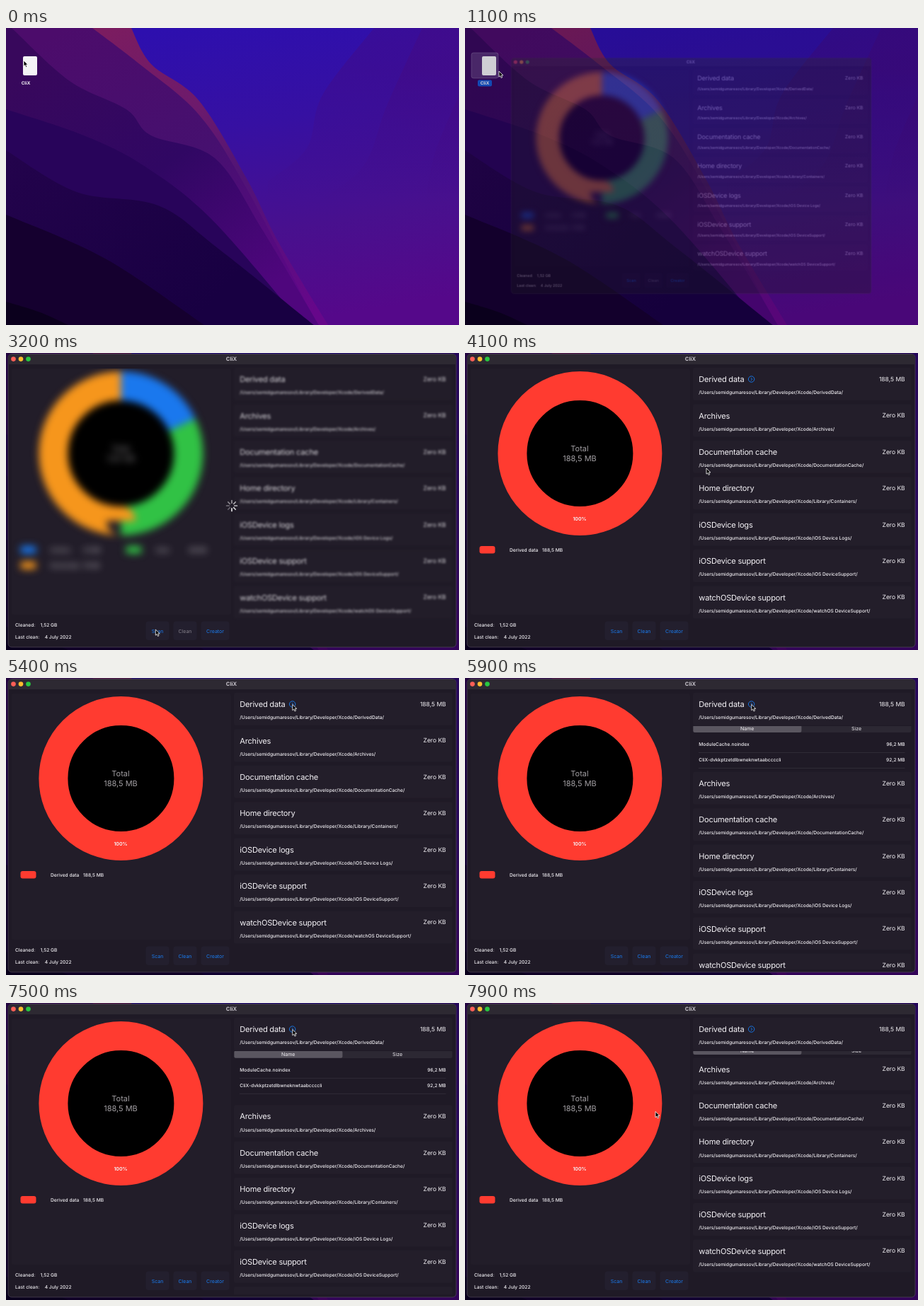
An HTML page that plays this animation: 640x420 px, repeating every 8 s.

```html
<!DOCTYPE html>
<html lang="en">
<head>
<meta charset="utf-8">
<title>CliX</title>
<style>
  html, body { margin: 0; width: 100%; height: 100%; overflow: hidden; background: #1a0338; }
  svg { display: block; width: 100vw; height: 100vh; }
  text { font-family: Inter, Roboto, "Liberation Sans", sans-serif; fill: #f4f2f6; white-space: pre; text-rendering: geometricPrecision; }
  .h { font-size: 11.1px; letter-spacing: -.02em; }
  .size { font-size: 8.5px; }
  .s { font-size: 6.65px; font-weight: 500; }
  .btn { font-size: 7px; }
  .end { text-anchor: end; }
  .mid { text-anchor: middle; }
  .total { font-size: 11px; fill: #a09da1; }
  .soft { filter: blur(5.5px); }
</style>
</head>
<body>
<svg id="stage" viewBox="0 0 640 420" preserveAspectRatio="none">
  <defs>
    <linearGradient id="sky" x1=".35" y1="0" x2=".6" y2="1">
      <stop offset="0" stop-color="#2d0fae"/><stop offset=".35" stop-color="#3610a2"/>
      <stop offset=".7" stop-color="#48108e"/><stop offset="1" stop-color="#55088a"/>
    </linearGradient>
    <radialGradient id="glow" gradientUnits="userSpaceOnUse" r="1" gradientTransform="translate(345 225) rotate(60) scale(165 85)">
      <stop offset="0" stop-color="#8246b4" stop-opacity=".75"/><stop offset="1" stop-color="#6428a8" stop-opacity="0"/>
    </radialGradient>
    <radialGradient id="pink" gradientUnits="userSpaceOnUse" r="1" gradientTransform="translate(410 325) scale(140 62)">
      <stop offset="0" stop-color="#98267f" stop-opacity=".8"/><stop offset="1" stop-color="#801a88" stop-opacity="0"/>
    </radialGradient>
    <radialGradient id="magenta" gradientUnits="userSpaceOnUse" r="1" gradientTransform="translate(455 395) scale(190 85)">
      <stop offset="0" stop-color="#7d049c" stop-opacity=".9"/><stop offset="1" stop-color="#660692" stop-opacity="0"/>
    </radialGradient>
    <linearGradient id="ridge" gradientUnits="userSpaceOnUse" x1="0" y1="60" x2="0" y2="250">
      <stop offset="0" stop-color="#46097c" stop-opacity=".38"/><stop offset="1" stop-color="#46097c" stop-opacity="0"/>
    </linearGradient>
    <linearGradient id="rim" gradientUnits="userSpaceOnUse" x1="150" y1="0" x2="400" y2="420">
      <stop offset="0" stop-color="#7b1c60"/><stop offset=".32" stop-color="#6d1a6c"/>
      <stop offset=".55" stop-color="#501476"/><stop offset="1" stop-color="#66078a"/>
    </linearGradient>
    <linearGradient id="slope" gradientUnits="userSpaceOnUse" x1="80" y1="0" x2="360" y2="420">
      <stop offset="0" stop-color="#4c0c6b"/><stop offset=".5" stop-color="#46106f"/><stop offset="1" stop-color="#5d0788"/>
    </linearGradient>
    <linearGradient id="hill" gradientUnits="userSpaceOnUse" x1="60" y1="30" x2="330" y2="400">
      <stop offset="0" stop-color="#38085c"/><stop offset=".5" stop-color="#300763"/><stop offset="1" stop-color="#4f067d"/>
    </linearGradient>
    <linearGradient id="dark" gradientUnits="userSpaceOnUse" x1="0" y1="180" x2="260" y2="420">
      <stop offset="0" stop-color="#23034c"/><stop offset="1" stop-color="#180042"/>
    </linearGradient>
    <clipPath id="listClip"><rect x="320" y="18" width="312" height="394"/></clipPath>
    <clipPath id="tableClip"><rect id="tableBox" x="322" y="68" width="309" height="0"/></clipPath>
    <clipPath id="panelClip"><rect x="8" y="22" width="310" height="348"/></clipPath>
  </defs>
</svg>
<script>
const LOOP = 8000, STEP = 100, OPEN = 133.2, PITCH = 51.4;
const BLUE = '#1a7df2', RED = '#ff3b30';
const stage = document.getElementById('stage');

function el(parent, tag, attrs = {}, text) {
  const n = document.createElementNS('http://www.w3.org/2000/svg', tag);
  for (const k in attrs) n.setAttribute(k, attrs[k]);
  if (text !== undefined) n.textContent = text;
  parent.appendChild(n);
  return n;
}
const group = (p, a) => el(p, 'g', a);
const label = (p, x, y, cls, s, more) => el(p, 'text', { x, y, class: cls, ...more }, s);
const box = (p, x, y, width, height, fill, rx = 0) => el(p, 'rect', { x, y, width, height, fill, rx });
const clamp = v => Math.max(0, Math.min(1, v));
const ease = (t, from, to) => (1 - Math.cos(Math.PI * clamp((t - from) / (to - from)))) / 2;

// Smooth line through a few points, then closed by the given path end.
function wave(parent, fill, close, ...p) {
  const at = i => p[Math.max(0, Math.min(p.length - 1, i))];
  let d = 'M' + p[0];
  for (let i = 0; i < p.length - 1; i++) {
    const [a, b, c, e] = [at(i - 1), at(i), at(i + 1), at(i + 2)];
    d += `C${[0, 1].map(k => b[k] + (c[k] - a[k]) / 6)} ${[0, 1].map(k => c[k] - (e[k] - b[k]) / 6)} ${c}`;
  }
  el(parent, 'path', { d: d + close, fill });
}

// Wallpaper
const desk = group(stage);
const wash = id => box(desk, 0, 0, 640, 420, `url(#${id})`);
['sky', 'glow'].forEach(wash);
const right = 'V420H640V0Z', left = 'H0V0Z', floor = 'H0Z';
wave(desk, 'url(#ridge)', right, [520, 0], [447, 95], [425, 170], [370, 217]);
wave(desk, 'url(#ridge)', right, [588, 0], [538, 110], [505, 195], [435, 250]);
wave(desk, 'url(#ridge)', right, [640, 95], [605, 180], [590, 260]);
['pink', 'magenta'].forEach(wash);
wave(desk, 'url(#rim)', left, [177, 0], [205, 51], [272, 102], [340, 213], [385, 303], [455, 420]);
wave(desk, 'url(#slope)', left, [122, 0], [190, 52], [272, 122], [340, 227], [440, 420]);
wave(desk, 'url(#hill)', left, [8, 0], [90, 75], [170, 115], [205, 152], [295, 184], [362, 285], [442, 420]);
wave(desk, '#28045a', floor, [0, 115], [110, 152], [195, 195], [290, 270], [420, 420]);
wave(desk, 'url(#dark)', floor, [0, 173], [100, 232], [215, 251], [300, 312], [435, 420]);
wave(desk, '#15002f', floor, [0, 264], [140, 326], [280, 420]);
wave(desk, '#0b001d', floor, [0, 387], [48, 402], [88, 420]);

// Desktop icon
const picked = group(desk);
el(picked, 'rect', { x: 9, y: 35, width: 38, height: 36, rx: 3, fill: '#9a86b5', 'fill-opacity': .3, stroke: '#b7a8c8', 'stroke-opacity': .5, 'stroke-width': .6 });
box(picked, 18, 73.5, 20, 9, '#1558d0', 2);
box(desk, 24, 40, 20, 27, '#f4f4f6', 2);
label(desk, 28, 80.3, 'mid', 'CliX', { 'font-size': 6.3, 'font-weight': 700 });

// Window frame with its shade on the desktop
const shade = box(stage, 0, 0, 640, 420, '#08001c');
const win = group(stage);
el(win, 'rect', { x: 3, y: 1.5, width: 633, height: 414.5, rx: 5, fill: '#1f1a26', stroke: '#514a5b', 'stroke-width': .7 });
el(win, 'path', { d: 'M3.4 16V6.5Q3.4 1.9 8 1.9H631Q635.6 1.9 635.6 6.5V16Z', fill: '#2d2932' });
['#ff5f57', '#febc2e', '#28c840'].forEach((fill, i) => el(win, 'circle', { cx: 10.5 + i * 10.5, cy: 8.6, r: 3.3, fill }));
label(win, 318.5, 11, 'mid', 'CliX', { 'font-size': 7.6, 'font-weight': 700, style: 'fill:#c6c2ca' });
box(win, 8, 22, 310, 348, '#221d29', 3);

// Ring chart: parts are [colour, share, name, size]
function chart(parent, total, parts) {
  const g = group(parent);
  const ring = { cx: 162.4, cy: 142, r: 95.5, fill: 'none', 'stroke-width': 41, pathLength: 100, transform: 'rotate(-90 162.4 142)' };
  el(g, 'circle', { cx: 162.4, cy: 142, r: 78, fill: '#000' });
  let from = 0;
  parts.forEach(([stroke, share, name, size], i) => {
    el(g, 'circle', { ...ring, stroke, 'stroke-dasharray': `${share} ${100 - share}`, 'stroke-dashoffset': -from });
    from += share;
    const x = i % 2 * 149, y = (i >> 1) * 22;
    box(g, 20.5 + x, 273 + y, 22, 10.5, stroke, 3);
    label(g, 63 + x, 280.7 + y, 's', name);
    label(g, 109 + x, 280.7 + y, 's', size);
  });
  label(g, 162, 139, 'total mid', 'Total');
  label(g, 162, 153.4, 'total mid', total);
  return g;
}
const before = group(win, { 'clip-path': 'url(#panelClip)' });
chart(before, '1,52 GB', [
  ['#1a78ee', 18, 'Archives', '273 MB'], ['#31c245', 32, 'Home', '486 MB'], ['#f6961c', 50, 'Derived data', '761 MB']
]).setAttribute('class', 'soft');
const after = chart(win, '188,5 MB', [[RED, 100, 'Derived data', '188,5 MB']]);
label(after, 162, 237.2, 'mid', '100%', { 'font-size': 7, 'font-weight': 600 });

// Footer
[['Cleaned:', '1,52 GB', 48.5], ['Last clean:', '4 July 2022', 54.7]].forEach(([name, value, x], i) => {
  const y = 386.6 + i * 17.6;
  label(win, 13, y, 's', name);
  label(win, x, y, 's', value);
});
const buttons = ['Scan', 'Clean', 'Creator'].map((s, i) => {
  const x = 197.5 + i * 39, w = s.length > 5 ? 40 : 33;
  box(win, x, 379.5, w, 26.5, '#231f2e', 4);
  return label(win, x + w / 2, 395.6, 'btn mid', s, { style: 'fill:' + BLUE });
});

// Folder list
const list = group(group(win, { 'clip-path': 'url(#listClip)' }));
const base = '/Users/semidgumaresov/Library/Developer/Xcode/';
const cards = [
  ['Derived data', 'DerivedData/'], ['Archives', 'Archives/'], ['Documentation cache', 'DocumentationCache/'],
  ['Home directory', 'Library/Containers/'], ['iOSDevice logs', 'iOS Device Logs/'],
  ['iOSDevice support', 'iOS DeviceSupport/'], ['watchOSDevice support', 'watchOS DeviceSupport/']
].map(([name, dir]) => {
  const g = group(list);
  box(g, 322, 0, 308.5, 46, '#231e2a', 3);
  label(g, 330.3, 20.2, 'h', name);
  label(g, 330.3, 37.3, 's', base + dir);
  g.size = label(g, 621.7, 19, 'size end', 'Zero KB');
  return g;
});
const more = group(cards[0], { fill: 'none', stroke: '#1676e6', 'stroke-width': 1 });
el(more, 'circle', { cx: 404.6, cy: 16, r: 4.2 });
el(more, 'path', { d: 'M403.8 14l2 2l-2 2' });

// Expanding table
const tableBox = document.getElementById('tableBox');
const table = group(group(list, { 'clip-path': 'url(#tableClip)' }));
box(table, 322, 71.6, 308.5, 10.6, '#2c2833', 2.5);
box(table, 322.4, 71.8, 153, 10.2, '#5a5660', 2.5);
['Name', 'Size'].forEach((s, i) => label(table, 398.7 + i * 154.3, 79.3, 'btn mid', s));
[['ModuleCache.noindex', '96,2 MB'], ['CliX-dvkkptzetdlbwneknwtaabccccli', '92,2 MB']].forEach(([name, size], i) => {
  const y = 101.6 + i * 22;
  label(table, 330.3, y, 's', name);
  label(table, 621.7, y, 's end', size);
  box(table, 330, y + 8.6, 291.5, .7, '#37323e');
});

// Spinner
const spin = group(win, { stroke: '#e4e2e6', 'stroke-width': 1.7, 'stroke-linecap': 'round' });
const spokes = Array.from({ length: 8 }, (_, i) =>
  el(spin, 'path', { d: 'M0-3.8V-7.4', transform: `translate(319 216) rotate(${i * 45})` }));

// Pointer: each move is [from, to, x, y]
const pointer = el(stage, 'path', {
  d: 'M0 0V8.2L1.9 6.5L3.2 9.5L4.7 8.8L3.4 5.9H6Z',
  fill: '#000', stroke: '#fff', 'stroke-width': .8, 'stroke-linejoin': 'round'
});
const moves = [
  [1000, 1600, 367.5, 270.5], [1900, 2900, 211.3, 391], [3700, 4100, 341, 163],
  [4300, 5200, 404.8, 37.5], [7700, 7900, 269, 153.5]
];
function pointerAt(t) {
  let [x, y] = [25, 46];
  for (const [from, to, nx, ny] of moves) {
    const k = ease(t, from, to);
    x += (nx - x) * k;
    y += (ny - y) * k;
  }
  return [x, y];
}
const show = (n, on) => n.setAttribute('display', on ? 'inline' : 'none');

function draw(t) {
  const done = t >= 3400, busy = t >= 2900 && !done;
  show(picked, t >= 300 && t < 1700);

  const open = ease(t, 900, 1400), k = .7 + .3 * open;
  show(win, open > 0);
  win.setAttribute('opacity', open);
  win.setAttribute('transform', `translate(${320 * (1 - k)} ${210 * (1 - k)}) scale(${k})`);
  shade.setAttribute('opacity', .45 * open);

  show(before, !done);
  show(after, done);
  show(more, done);
  cards[0].size.textContent = done ? '188,5 MB' : 'Zero KB';
  buttons[1].style.fill = done ? BLUE : '#85818a';

  const blur = busy ? clamp((t - 2800) / 300) : 0;
  list.style.filter = blur ? `blur(${1.8 * blur}px)` : 'none';
  list.style.opacity = 1 - .15 * blur;
  show(spin, busy);
  const head = t / STEP + 4;
  spokes.forEach((s, i) => s.setAttribute('opacity', 1 - .75 * ((head - i) % 8) / 8));

  const gap = OPEN * (ease(t, 5430, 6430) - ease(t, 7025, 8025));
  cards.forEach((c, i) => c.setAttribute('transform', `translate(0 ${21 + i * PITCH + (i ? gap : 0)})`));
  tableBox.setAttribute('height', gap);
  table.setAttribute('transform', `translate(0 ${-.07 * (OPEN - gap)})`);
  show(table, gap > 0);

  pointer.setAttribute('transform', `translate(${pointerAt(t)})`);
}

const start = performance.now();
function tick() {
  const t = (performance.now() - start) % LOOP;
  draw(Math.floor(t / STEP) * STEP);
  requestAnimationFrame(tick);
}
tick();
</script>
</body>
</html>
```
